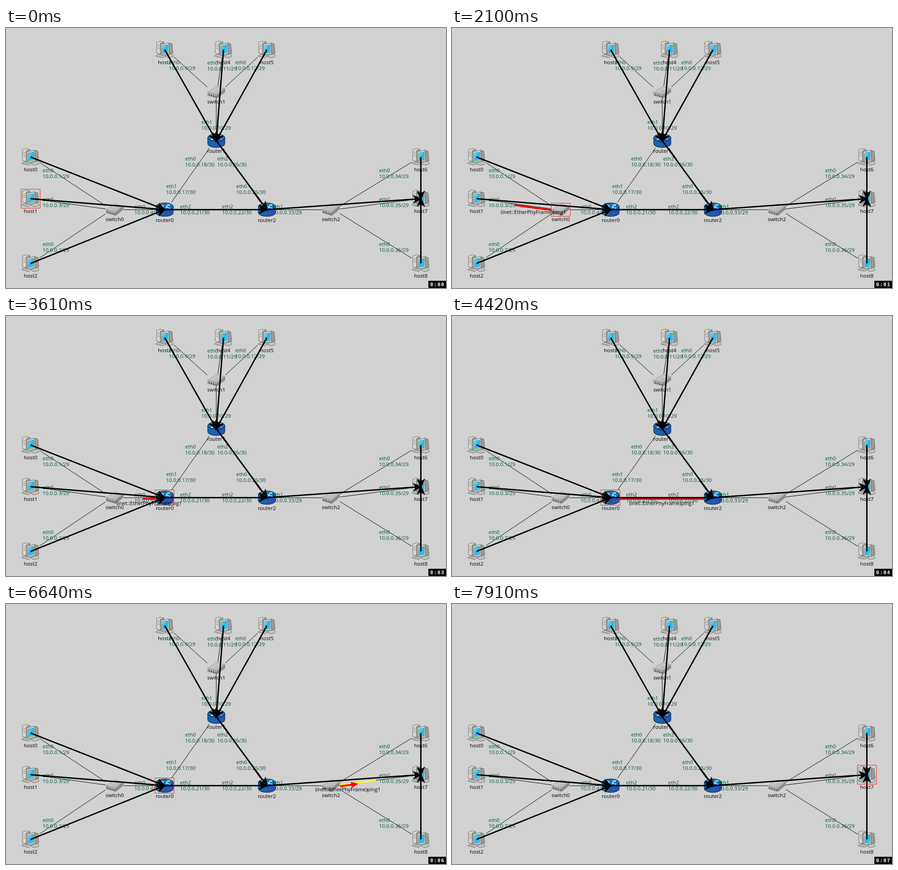
An HTML page for the animation above (8 s loop, 973x575 px).

```html
<!DOCTYPE html>
<html lang="en">
<head>
<meta charset="utf-8">
<title>Network packet flow</title>
<style>
  html, body { margin: 0; width: 100%; height: 100%; overflow: hidden; background: #d1d1d1; }
  svg { display: block; width: 973px; height: 575px; }
  text { font: 11.4px "Open Sans", "Noto Sans", sans-serif; white-space: pre; }
  .mid { text-anchor: middle; }
  .addr { fill: #00563a; }
  .link { stroke: #000; stroke-width: 1; }
  .route { stroke: #000; stroke-width: 3; }
  .clock { font: bold 11px "DejaVu Sans Mono", monospace; letter-spacing: 1.4px; fill: #fff; }
</style>
</head>
<body>
<svg id="stage" viewBox="0 0 973 575">
  <defs>
    <linearGradient id="blue"><stop offset="0" stop-color="#1268ad"/><stop offset="1" stop-color="#2c50b8"/></linearGradient>
    <linearGradient id="metal" x2="1" y2="1"><stop offset="0" stop-color="#dedede"/><stop offset="1" stop-color="#a2a2a2"/></linearGradient>
    <linearGradient id="screen" x2="1" y2="1"><stop offset="0" stop-color="#8be6ff"/><stop offset=".5" stop-color="#14bdf5"/><stop offset="1" stop-color="#39d0ff"/></linearGradient>
    <g id="host" stroke="#555" stroke-width=".8" stroke-linejoin="round">
      <path d="M-18-16L-10-19L-2-17V6L-10 10L-18 7Z" fill="#d9d9d2"/>
      <path d="M-10-14L-2-17V6L-10 10Z" fill="#a9aaa6"/>
      <path d="M-16-11l4 1M-16-7l4 1M-16-3l4 1" fill="none"/>
      <path d="M2 12L14 9L19 13L17 16L8 18L3 16Z" fill="#c4c4bf"/>
      <path d="M9-15L16-13L18 8L10 10Z" fill="#9b9c98"/>
      <path d="M-8-12L9-15L10 10L-6 11Z" fill="#d6d6d0"/>
      <path d="M-5-9L7-11V7L-4 8Z" fill="url(#screen)" stroke="#39849c"/>
      <path d="M-20 14L-14 10L2 14L-4 18Z" fill="#d6d6d0"/>
      <path d="M-17 14L-5 17M-15 12L-2 15" fill="none" stroke-dasharray="2 1"/>
    </g>
    <g id="switch" stroke="#777" stroke-width=".7" stroke-linejoin="round">
      <path d="M-19 0L1-13L19-8L2 6Z" fill="url(#metal)"/>
      <path d="M2 6L19-8V-1L2 13Z" fill="#8b8b8b"/>
      <path d="M-19 0L2 6V13L-19 7Z" fill="#b4b4b4"/>
      <path d="M-17 3l3 1v3l-3-1zM-12 4.500l3 1v3l-3-1zM-7 6l3 1v3l-3-1zM-2 7.500l3 1v3l-3-1z" fill="#4a4f55" stroke="none"/>
    </g>
    <g id="router" stroke="#081a2c" stroke-width="1">
      <path d="M-19-7V7A19 8 0 0 0 19 7V-7Z" fill="url(#blue)"/>
      <ellipse cy="-7" rx="19" ry="8" fill="#1272b4"/>
      <path d="M-12-11L-4-8M4-6L12-3M-10-3L-3-6M3-8L10-11M-7-8.500L-3-8L-5-10M10-8L11-11L6-11M-6-3L-11-2.500L-10-5M7-6.500L3-6L5-4" fill="none" stroke="#e6f3fb" stroke-width="1.400"/>
    </g>
  </defs>
</svg>
<script>
const stage = document.getElementById('stage');

function add(tag, attrs, text) {
  const el = document.createElementNS('http://www.w3.org/2000/svg', tag);
  set(el, attrs);
  if (text) el.textContent = text;
  stage.append(el);
  return el;
}
function set(el, attrs) {
  for (const k in attrs) el.setAttribute(k, attrs[k]);
}

const nodes = {
  host0: [54.4, 285.4], host1: [54.4, 377.5], host2: [54.4, 520.6],
  host3: [351, 48], host4: [481, 48], host5: [577, 48],
  host6: [917.4, 285.4], host7: [917.4, 377.5], host8: [917.4, 520.6],
  switch0: [240.4, 402], switch1: [465, 142.4], switch2: [718.4, 402],
  router0: [350.9, 401.7], router1: [465, 249.3], router2: [576.9, 401.7]
};
const half = { host: [20, 19], switch: [20, 14], router: [20, 16] };
const labelDrop = { host: 31.5, switch: 25, router: 27 };
const kind = id => id.slice(0, -1);

// Point where the link from a to b meets the icon of a.
function edge(a, b) {
  const [x, y] = nodes[a], dx = nodes[b][0] - x, dy = nodes[b][1] - y;
  const [w, h] = half[kind(a)];
  const m = Math.max(Math.abs(dx), Math.abs(dy));
  return [x + w * dx / m, y + h * dy / m];
}
function line(cls, [x1, y1], [x2, y2]) {
  return add('line', { class: cls, x1, y1, x2, y2 });
}

const links = `host0 switch0,host1 switch0,host2 switch0,switch0 router0,router0 router2,
  router0 router1,router1 router2,router1 switch1,host3 switch1,host4 switch1,host5 switch1,
  router2 switch2,switch2 host6,switch2 host7,switch2 host8`;
const routes = `host0 router0,host1 router0,host2 router0,router0 router2,host3 router1,host4 router1,
  host5 router1,router1 router2,router2 host7,host6 host7,host8 host7`;
const pairs = s => s.split(',').map(p => p.trim().split(' '));

// x, first baseline, interface, address
const addresses = [
  [81, 319, 0, '1/29'], [81, 383, 0, '3/29'], [81, 482, 0, '2/29'], [284, 399, 0, '4/29'],
  [354, 354, 1, '17/30'], [385, 399, 2, '21/30'], [478, 399, 2, '22/30'], [509, 354, 0, '25/30'],
  [589, 399, 1, '33/29'], [432, 212, 1, '10/29'], [396, 293, 0, '18/30'], [467, 293, 2, '26/30'],
  [360, 80, 0, '9/29'], [445, 81, 0, '11/29'], [507, 80, 0, '12/29'],
  [825, 319, 0, '34/29'], [825, 383, 0, '35/29'], [825, 482, 0, '36/29']
];

for (const [a, b] of pairs(links)) line('link', edge(a, b), edge(b, a));
for (const id in nodes) {
  const [x, y] = nodes[id];
  add('use', { href: '#' + kind(id), x, y });
  add('text', { class: 'mid', x, y: Math.round(y + labelDrop[kind(id)]) }, id);
}
for (const [x, y, port, ip] of addresses) {
  add('text', { class: 'addr', x, y }, 'eth' + port);
  add('text', { class: 'addr', x, y: y + 12.5 }, '10.0.0.' + ip);
}

const glow = add('line', { stroke: '#ff0', 'stroke-width': 3 });
const beam = add('line', { stroke: '#f00', 'stroke-width': 4 });
const tip = add('path', { d: 'M0 0L-16-6.500V6.500Z', fill: '#f00' });

for (const [a, b] of pairs(routes)) {
  const [x1, y1] = nodes[a], [x2, y2] = nodes[b];
  const angle = Math.atan2(y2 - y1, x2 - x1);
  line('route', nodes[a], nodes[b]);
  add('path', {
    d: 'M4 0L-18-9.500L-12 0L-18 9.500Z',
    transform: `translate(${x2} ${y2}) rotate(${angle * 180 / Math.PI})`
  });
}

const frame = add('rect', { fill: 'none', stroke: '#f0201c', 'stroke-width': 1 });
const note = add('text', { class: 'mid' }, '(inet::EtherPhyFrame)ping1');
add('rect', { x: 934, y: 559, width: 39, height: 16 });
const clock = add('text', { class: 'clock', x: 938, y: 571 }, '0:00');

const LOOP = 8000;
// Screen updates come in bursts: first, last, count
const bursts = [[960, 1520, 6], [1880, 2930, 10], [3170, 4420, 12], [4660, 5700, 10], [5940, 7110, 11], [7350, 7910, 6]];
// from, to, head leaves, head arrives, tail leaves, tail arrives
const hops = [
  ['host1', 'switch0', 870, 1490, 1780, 2250],
  ['switch0', 'router0', 2254, 2860, 3070, 3805],
  ['router0', 'router2', 3810, 4410, 4560, 5085],
  ['router2', 'switch2', 5088, 5694, 5840, 6500],
  ['switch2', 'host7', 6504, 7110, 7250, 7900]
];
const focus = [
  [0, 'host1'], [960, 'switch0'], [1520, 'host1'], [1880, 'switch0'], [2250, 'host1'],
  [2930, 'switch0'], [3170, 'router0'], [3810, 'switch0'], [4420, 'router0'], [4660, 'router2'],
  [5080, 'switch2'], [5700, 'router2'], [5940, 'switch2'], [6500, 'router0'], [7110, 'switch2'],
  [7350, 'host7']
];

function snap(t) {
  let last = 0;
  for (const [a, b, n] of bursts) {
    const step = (b - a) / (n - 1);
    for (let i = 0; i < n; i++) {
      const s = Math.floor((a + i * step) / 10) * 10;
      if (s <= t) last = s;
    }
  }
  return last;
}
const ramp = (t, a, b) => Math.min(1, Math.max(0, (t - a) / (b - a)));
const show = (el, on) => el.setAttribute('visibility', on ? 'visible' : 'hidden');

function drawSignal(t) {
  const hop = hops.find(h => t >= h[2] && t < h[5]);
  const head = hop ? ramp(t, hop[2], hop[3]) : 0;
  const on = head > .15;
  const tail = on ? ramp(t, hop[4], hop[5]) : 0;
  show(glow, on && !tail);
  show(beam, on);
  show(note, on);
  show(tip, on && head < 1);
  if (!on) return;

  const [x1, y1] = edge(hop[0], hop[1]), [x2, y2] = edge(hop[1], hop[0]);
  const dx = x2 - x1, dy = y2 - y1, len = Math.hypot(dx, dy);
  const ux = dx / len, uy = dy / len;
  const at = (k, off) => [x1 + dx * k - uy * off, y1 + dy * k + ux * off];
  const [ax, ay] = at(tail, 2.7), [bx, by] = at(head, 2.7);
  const [mx, my] = at((head + tail) / 2, 0);
  set(glow, { x1, y1, x2: x1 + dx / 2, y2: y1 + dy / 2 });
  set(beam, { x1: ax, y1: ay, x2: bx, y2: by });
  set(tip, { transform: `translate(${bx + ux * 5} ${by + uy * 5}) rotate(${Math.atan2(dy, dx) * 180 / Math.PI})` });
  set(note, { x: mx, y: Math.round(my + 16.2) });
}

function drawFocus(t) {
  const id = focus.filter(f => f[0] <= t).pop()[1];
  const [x, y] = nodes[id];
  const h = { host: 21, switch: 14.5, router: 17 }[kind(id)];
  set(frame, { x: Math.floor(x) - 20.5, y: Math.floor(y - h) + .5, width: 42, height: h * 2 });
}

function draw() {
  const t = snap(performance.now() % LOOP);
  drawSignal(t);
  drawFocus(t);
  clock.textContent = '0:0' + Math.max(0, Math.floor((t - 200) / 1000));
  requestAnimationFrame(draw);
}
draw();
</script>
</body>
</html>
```
